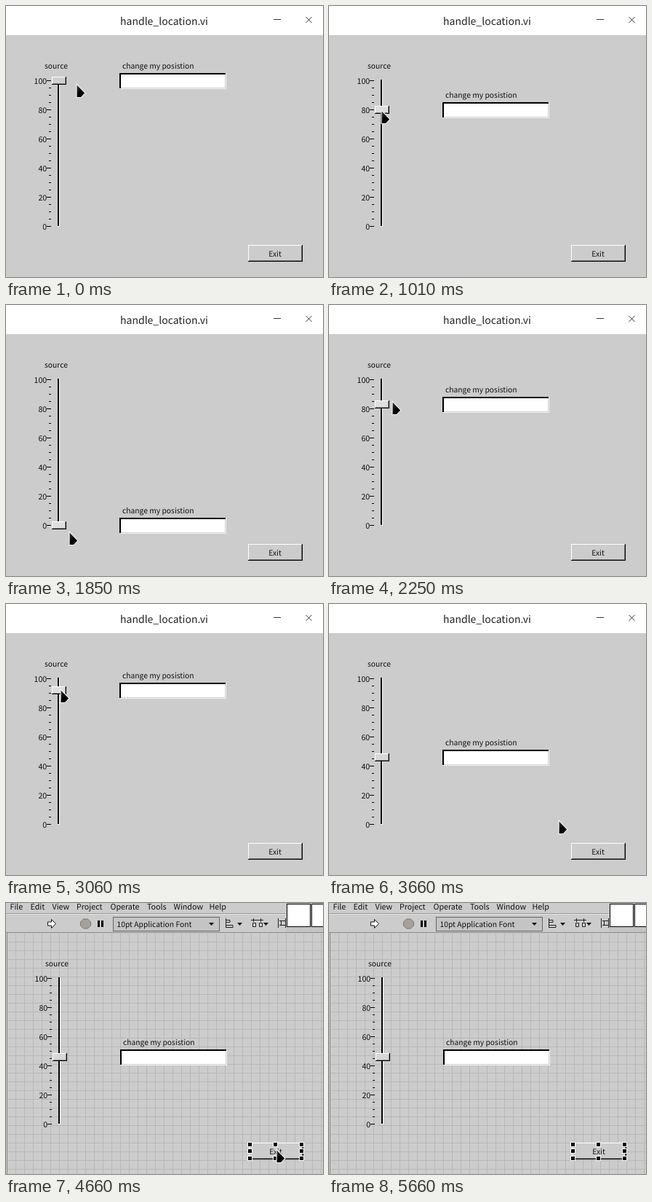
An HTML page that plays this animation: 436x372 px, repeating every 6.26 s.

```html
<!DOCTYPE html>
<html lang="en">
<head>
<meta charset="utf-8">
<title>Slider moves a field</title>
<style>
html, body { margin: 0; width: 100%; height: 100%; overflow: hidden; background: #cbcccb; }
svg { display: block; width: 436px; height: 372px; }
text {
  font: 10.3px "Noto Sans CJK SC", "Noto Sans CJK JP", "Noto Sans CJK", "Noto Sans", sans-serif;
  fill: #111; text-rendering: geometricPrecision; white-space: pre;
}
.title { font-size: 14px; fill: #222; text-anchor: middle; }
.menu { font-size: 10.7px; }
.num { font-size: 10.7px; text-anchor: end; }
.mid { text-anchor: middle; }
.crisp { shape-rendering: crispEdges; }
.off { display: none; }
</style>
</head>
<body>
<svg viewBox="0 0 436 372">
  <defs>
    <pattern id="mesh" x="13" y="53" width="12" height="12" patternUnits="userSpaceOnUse">
      <path class="crisp" d="M0 .5H12M.5 0V12" stroke="#b7b8b7" fill="none"/>
    </pattern>
    <linearGradient id="ink" x2="1" y2="1">
      <stop offset="0" stop-color="#444"/><stop offset=".5" stop-color="#000"/>
    </linearGradient>
  </defs>
  <rect width="436" height="372" fill="#cbcccb"/>

  <g id="titleBar">
    <rect width="436" height="40" fill="#fff"/>
    <text class="title" x="217.5" y="26">handle_location.vi</text>
    <path d="M368 18.5h10M412.5 15l8 8m0-8l-8 8" stroke="#333" fill="none"/>
  </g>

  <g id="editor" class="off">
    <rect x="2" y="42" width="434" height="330" fill="url(#mesh)"/>
    <path class="crisp" d="M0 40.5H436M1.5 41V372" stroke="#8a8a8a" fill="none"/>
    <path class="crisp" d="M0 14.5H385" stroke="#999"/>
    <path class="crisp" d="M0 15.5H385" stroke="#e6e6e6"/>
    <g id="menus"></g>
    <path d="M57.500 26h5v-3.500l6 6-6 6v-3.500h-5z" fill="#fff" stroke="#111"/>
    <path d="M106.500 22h6l4 4v5l-4 4h-6l-4-4v-5z" fill="#a89f99" stroke="#777"/>
    <path class="crisp" d="M126 24h3v9h-3zM131 24h3v9h-3z" fill="#000"/>
    <rect x="147.500" y="19.500" width="146" height="19" fill="#c3c4c3" stroke="#666"/>
    <text x="152.500" y="33">10pt Application Font</text>
    <path d="M279 27h7l-3.500 4z" fill="#111"/>
    <g fill="none" stroke="#222">
      <path d="M302.500 21v13M302 23.500h6v3h-6M302 30.500h10v3h-10"/>
      <path d="M337 23.500h17M340.500 21v5M350.500 21v5M339.500 27.500h4v5h-4zM348.500 27.500h4v5h-4z"/>
      <path d="M374.500 21v13M384.500 21v13M376 24.500h9M376 30.500h9M378.500 24v6"/>
    </g>
    <path d="M318 27h7l-3.500 4zM354 27h7l-3.500 4z" fill="#111"/>
    <rect x="385" width="51" height="40" fill="#c3c4c3"/>
    <g class="crisp" fill="#fff" stroke="#000">
      <rect x="386.500" y="1.500" width="32" height="31"/>
      <rect x="420.500" y="1.500" width="32" height="31"/>
    </g>
  </g>

  <g id="panel">
    <text class="mid" x="69" y="86">source</text>
    <g id="scale"></g>
    <g class="crisp">
      <rect x="71" y="101" width="2" height="202" fill="#000"/>
      <path d="M73 101h1v202h-3v-1h2z" fill="#fff"/>
    </g>
    <g id="thumb" class="crisp">
      <rect x="63" y="-5" width="20" height="11" fill="#000"/>
      <rect x="63" y="-5" width="19" height="10" fill="#fff"/>
      <rect x="64" y="-4" width="18" height="9" fill="#888"/>
      <rect id="face" x="64" y="-4" width="17" height="8"/>
    </g>
    <g id="field">
      <text x="160" y="-16">change my posistion</text>
      <g class="crisp">
        <rect x="156" y="-10" width="147" height="22" fill="#f4f4f4"/>
        <rect x="156" y="-10" width="146" height="21" fill="#000"/>
        <rect x="158" y="-8" width="144" height="19" fill="#d0d0d0"/>
        <rect x="158" y="-8" width="143" height="18" fill="#fff"/>
      </g>
    </g>
    <g id="raised" class="crisp">
      <rect x="333" y="328" width="75" height="23" fill="#000"/>
      <rect x="333" y="328" width="74" height="22" fill="#fff"/>
      <rect x="334" y="329" width="73" height="21" fill="#777"/>
      <rect x="334" y="329" width="72" height="20" fill="#cbcccb"/>
    </g>
    <rect id="flat" x="333.500" y="328.500" width="74" height="22" fill="#cbcccb" stroke="#555"/>
    <text id="exit" class="mid" x="370" y="344">Exit</text>
  </g>
  <g id="handles" class="crisp off" fill="#000" stroke="#fff"></g>

  <path id="cursor" d="M0 0L12 12.500L6.500 18.500H0Z" fill="url(#ink)" stroke="#eee" stroke-width="1.200"/>
</svg>
<script>
const LOOP = 6260, EDIT_AT = 4660, PRESS_AT = 4460;
const $ = id => document.getElementById(id);
const show = (id, on) => $(id).classList.toggle('off', !on);
const move = (id, x, y) => $(id).setAttribute('transform', `translate(${x} ${y})`);

// Pointer steps: time, slider y, pointer x, pointer y
const steps = [
  [0, 102, 97, 107], [200, 102, 84, 104], [400, 102, 73, 103], [600, 106, 72, 107],
  [810, 120, 72, 121], [1010, 142, 72, 143], [1210, 251, 78, 252],
  [1410, 282, 82, 282], [1610, 302, 85, 306], [1820, 302, 87, 311],
  [2030, 220, 88, 219], [2250, 136, 87, 132], [2450, 122, 84, 120],
  [2650, 104, 79, 103], [2850, 102, 75, 101], [3060, 118, 75, 117],
  [3260, 168, 77, 167], [3460, 210, 84, 210], [3660, 210, 316, 297],
  [3860, 210, 366, 328], [4060, 210, 384, 337], [4260, 210, 387, 338],
  [4460, 210, 387, 338], [4660, 210, 372, 338],
  [4860, 210, 352, 338], [5060, 210, 338, 333], [5260, 210, 322, 326],
  [5460, 210, 307, 320], [5660, 210]
];

let ticks = '';
for (let v = 0; v <= 100; v += 5) {
  const y = 302 - v * 2, major = v % 20 === 0;
  ticks += `<rect class="crisp" x="${major ? 56 : 59}" y="${y}" width="${major ? 6 : 3}" height="1"/>`;
  if (major) ticks += `<text class="num" x="56.300" y="${y + 5}">${v}</text>`;
}
$('scale').innerHTML = ticks;

$('menus').innerHTML = Object.entries({
  File: 5.5, Edit: 33.5, View: 63.5, Project: 97, Operate: 143.5, Tools: 194, Window: 230.5, Help: 279.5
}).map(([name, x]) => `<text class="menu" x="${x}" y="9">${name}</text>`).join('');

for (const x of [336, 371, 407])
  for (const y of [331, 340, 350])
    if (x !== 371 || y !== 340)
      $('handles').innerHTML += `<rect x="${x - 3.5}" y="${y - 2.5}" width="6" height="6"/>`;

function draw(t) {
  const [at, y, cx, cy] = steps.findLast(s => s[0] <= t);
  const editing = at >= EDIT_AT, pressed = at >= PRESS_AT && !editing;
  const dragging = at >= 400 && at < 3460;
  show('titleBar', !editing);
  show('editor', editing);
  show('handles', editing);
  show('raised', !pressed);
  show('flat', pressed);
  show('cursor', cx !== undefined);
  move('panel', +editing, +editing);
  move('exit', +pressed, +pressed);
  move('thumb', 0, y);
  move('field', 0, y);
  $('face').setAttribute('fill', dragging ? '#dedede' : at < 400 ? '#cfcfcf' : '#d8d8d8');
  if (cx !== undefined) move('cursor', cx, cy);
}

const start = performance.now();
function tick() {
  draw((performance.now() - start) % LOOP);
  requestAnimationFrame(tick);
}
tick();
</script>
</body>
</html>
```
